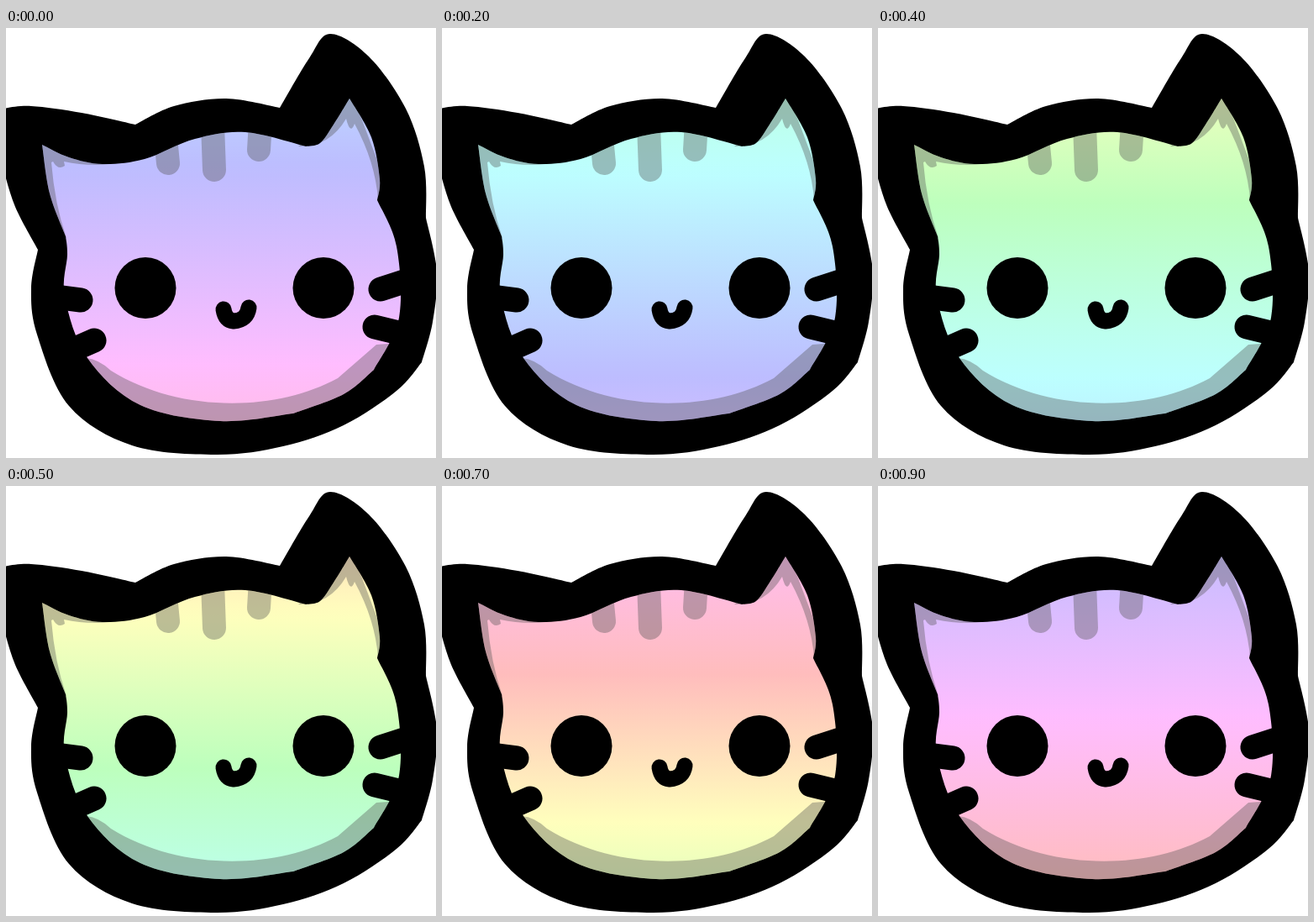
Animation, 512 px wide and 512 px high, one loop 1 s. Source, as an HTML page with a canvas:

```html
<!DOCTYPE html>
<html lang="en">
<head>
<meta charset="utf-8">
<title>Rainbow cat</title>
<style>
  html, body { margin: 0; width: 100%; height: 100%; overflow: hidden; background: #fff; }
  canvas { display: block; width: 100vmin; height: 100vmin; }
</style>
</head>
<body>
<canvas id="stage" width="512" height="512"></canvas>
<script>
const ctx = document.getElementById('stage').getContext('2d');
const LOOP = 1000, STEPS = 10, TURN = Math.PI * 2;

// Smooth curve through "x,y" points; "|" marks a sharp corner.
function spline(text) {
  const path = new Path2D();
  let last = null;
  for (const part of text.split('|')) {
    const pts = part.trim().split(/\s+/).map(p => p.split(',').map(Number));
    if (last) pts.unshift(last);
    else path.moveTo(...pts[0]);
    for (let i = 0; i < pts.length - 1; i++) {
      const a = pts[i - 1] || pts[i], b = pts[i], c = pts[i + 1], d = pts[i + 2] || c;
      path.bezierCurveTo(
        b[0] + (c[0] - a[0]) / 6, b[1] + (c[1] - a[1]) / 6,
        c[0] - (d[0] - b[0]) / 6, c[1] - (d[1] - b[1]) / 6, c[0], c[1]);
    }
    last = pts[pts.length - 1];
  }
  path.closePath();
  return path;
}

const outline = spline(`-4,96 30,93 90,101 154,115 | 200,93 262,84 326,95 |
  361,36 386,7 432,34 476,96 498,165 500,226 | 513,290 508,350 495,398 |
  465,432 402,473 330,498 250,508 150,497 75,450 37,365 30,310 38,264 | 11,213 -4,165`);

const face = spline(`43,139 75,154 115,162 165,156 225,132 285,124 357,141 |
  374,137 390,115 409,84 | 435,130 445,180 442,205 | 465,260 468,345 438,407 |
  402,436 342,459 | 255,468 160,449 97,393 70,320 73,270 71,248 | 52,197 43,139`);

// Chin, then left and right ear
const shade = new Path2D(`M95 393Q110 394 125 408C205 458 320 458 395 417L441 377L480 374V490H90Z
  M30 130L150 157Q110 168 69 159L70 164Q62 170 56 159L54 160Q58 210 72 250H30Z
  M409 70L460 205H443Q440 160 415 114Q410 128 405 108Q385 142 348 141L380 115Z`);

const mouth = new Path2D('M259 335Q261 348 271 349Q287 348 289 333');
const stripes = [[190, 130, 193, 161], [246, 115, 248, 169], [303, 112, 301, 145]];
const whiskers = [[58, 320, 89, 324], [80, 383, 105, 372], [446, 311, 480, 300], [439, 356, 472, 364]];

function lines(list, width) {
  ctx.lineWidth = width;
  ctx.beginPath();
  for (const [x1, y1, x2, y2] of list) {
    ctx.moveTo(x1, y1);
    ctx.lineTo(x2, y2);
  }
  ctx.stroke();
}

// Hue runs down the face and shifts each step, with a slight ease around the wheel.
function rainbow(step) {
  const fill = ctx.createLinearGradient(0, 0, 0, 512);
  for (let i = 0; i <= 32; i++) {
    const phase = 194 + 0.29 * i * 16 - step * 360 / STEPS;
    const hue = phase + 10 * Math.sin((phase - 50) * TURN / 360);
    fill.addColorStop(i / 32, `hsl(${(hue + 360) % 360}, 100%, 87%)`);
  }
  return fill;
}

function draw(step) {
  ctx.clearRect(0, 0, 512, 512);
  ctx.lineCap = 'round';
  ctx.fillStyle = ctx.strokeStyle = '#000';
  ctx.fill(outline);

  ctx.save();
  ctx.clip(face);
  ctx.fillStyle = rainbow(step);
  ctx.fillRect(0, 0, 512, 512);
  ctx.fillStyle = ctx.strokeStyle = 'rgba(86, 86, 86, 0.38)';
  ctx.fill(shade);
  lines(stripes, 28);
  ctx.restore();

  lines(whiskers, 29);
  ctx.lineWidth = 19;
  ctx.stroke(mouth);
  for (const x of [166, 378]) {
    ctx.beginPath();
    ctx.arc(x, 309.5, 36.5, 0, TURN);
    ctx.fill();
  }
}

function tick() {
  draw(Math.floor(performance.now() % LOOP / LOOP * STEPS));
  requestAnimationFrame(tick);
}
tick();
</script>
</body>
</html>
```
